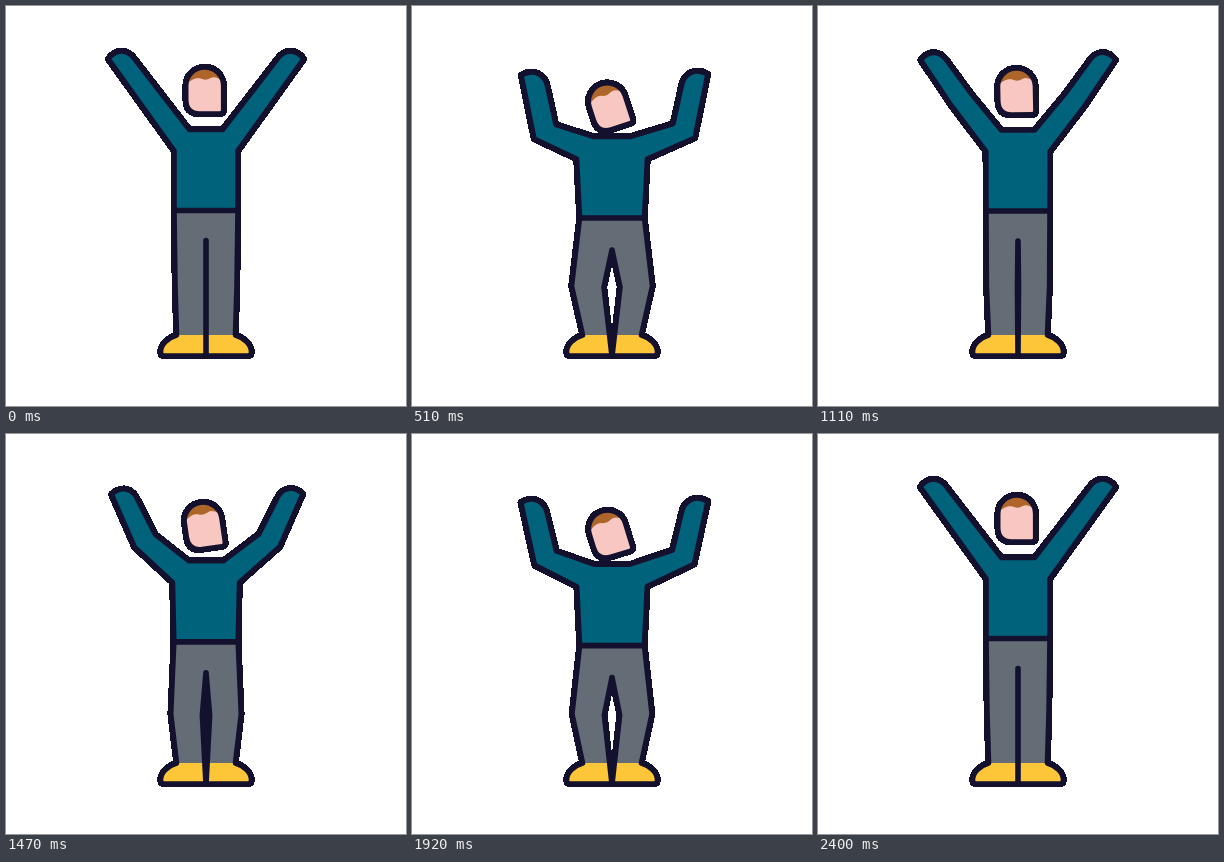
Animation of 400x400 px, one loop 2.43 s. Source, as an HTML page:

```html
<!DOCTYPE html>
<html lang="en">
<head>
<meta charset="utf-8">
<title>Cheering figure</title>
<style>
  html, body { margin: 0; width: 100%; height: 100%; overflow: hidden; background: #fff; }
  svg { display: block; width: 100%; height: 100%; }
  .line, .edge { fill: none; stroke: #14112f; stroke-width: 5.6; stroke-linejoin: round; stroke-linecap: round; }
  .edge { stroke-width: 6.6; shape-rendering: crispEdges; }
</style>
</head>
<body>
<svg viewBox="0 0 400 400">
  <defs>
    <path id="legs"/>
    <path id="shirt"/>
    <path id="face" d="M-19-5A19 18.500 0 0 1 19-5V19.500Q19 23.500 15 23.500H-5Q-19 23.500-19 9Z"/>
  </defs>
  <!-- hard dark rim behind the figure -->
  <g class="edge">
    <use href="#legs"/>
    <use href="#shirt"/>
    <use href="#face" class="head"/>
  </g>
  <path id="pants" fill="#646d76"/>
  <path id="shoes" fill="#fdc638"/>
  <use href="#legs" class="line"/>
  <use href="#shirt" fill="#00627b"/>
  <use href="#shirt" class="line"/>
  <g class="head">
    <use href="#face" fill="#f9c7c2"/>
    <path fill="#ae6529" d="M-18-7C-12-12-8-13-4-12Q1-9.500 6-12.500Q11-15 18-9Q17-23.500 0-23.500T-18-7Z"/>
    <use href="#face" class="line"/>
  </g>
</svg>
<script>
const el = id => document.getElementById(id);
const STEP = 30, LOOP = 2430, CYCLE = 1200;

const mix = (a, b, k) => a + (b - a) * k;
const mixPt = (p, q, k) => [mix(p[0], q[0], k), mix(p[1], q[1], k)];
const smooth = p => p * p * (3 - 2 * p);

// Left half of the shirt in both poses
const up = { tip: [102, 53], base: [129, 53], neck: [183.5, 123.5], pit: [168, 145], waist: [168, 204.5] };
up.outer = mixPt(up.tip, up.pit, 0.48);
up.inner = mixPt(up.base, up.neck, 0.46);
const down = {
  tip: [109, 69], base: [136, 82], neck: [182, 130.5], pit: [164.5, 153], waist: [167.5, 212],
  outer: [122, 133], inner: [144, 118.5]
};
// The down pose above is the one reached at 85 % of the way
const DOWN_AT = smooth(0.85);

// Half shirt from the waist over the hand to the neck; the right arm leans out a little
function half(k, right) {
  const at = name => {
    const [x, y] = mixPt(up[name], down[name], k);
    const lean = right && !/neck|pit|waist/.test(name) ? k : 0;
    return right ? [400 - x + 5 * lean, y - lean] : [x, y];
  };
  const tip = at('tip'), base = at('base'), side = right ? -1 : 1;
  const rise = [(base[1] - tip[1]) * 0.4 * side, (tip[0] - base[0]) * 0.4 * side];
  const handle = f => mixPt(tip, base, f).map((v, i) => v + rise[i]);
  return [at('waist'), at('pit'), at('outer'), tip, handle(0.28), handle(0.72), base, at('inner'), at('neck')];
}

function shirtPath(k) {
  const l = half(k, false), r = half(k, true).reverse();
  return `M${l.slice(0, 4)}C${l.slice(4, 7)}L${l.slice(7)},${r.slice(0, 3)}C${r.slice(3, 6)}L${r.slice(6)}Z`;
}

function drawLegs(k) {
  const waist = mix(204.5, 212, k), hip = mix(32, 32.5, k);
  const crotch = mix(234.5, 244, k), knee = mix(31, 40.5, k), gap = 8 * k;
  const ankle = gap * 21 / 69;
  let pants = '', shoes = '', legs = '';
  for (const side of [-1, 1]) {
    const x = d => 200 + side * d;
    const leg = `M${x(hip)} ${waist}L${x(knee)} 280L${x(29.5)} 329`;
    const shoe = `C${x(38)} 331.500 ${x(45.5)} 338 ${x(45.5)} 346Q${x(45.5)} 350 ${x(42)} 350H200`;
    const seam = `L${x(gap)} 281L200 ${crotch}`;
    pants += `${leg}H${x(ankle)}${seam}V${waist}Z`;
    shoes += `M${x(29.5)} 329${shoe}L${x(ankle)} 329Z`;
    legs += leg + shoe + seam;
  }
  el('pants').setAttribute('d', pants);
  el('shoes').setAttribute('d', shoes);
  el('legs').setAttribute('d', legs);
}

function draw(ms) {
  const t = Math.floor((ms % LOOP) / STEP) * STEP % CYCLE;
  const k = smooth(1 - Math.abs(1 - t / (CYCLE / 2))) / DOWN_AT;
  drawLegs(k);
  el('shirt').setAttribute('d', shirtPath(k));
  const pose = `translate(${mix(198.7, 196.7, k)} ${mix(84.5, 100, k)}) rotate(${-18 * k})`;
  for (const part of document.querySelectorAll('.head')) part.setAttribute('transform', pose);
}

const start = performance.now();
function tick() {
  draw(performance.now() - start);
  requestAnimationFrame(tick);
}
tick();
</script>
</body>
</html>
```
